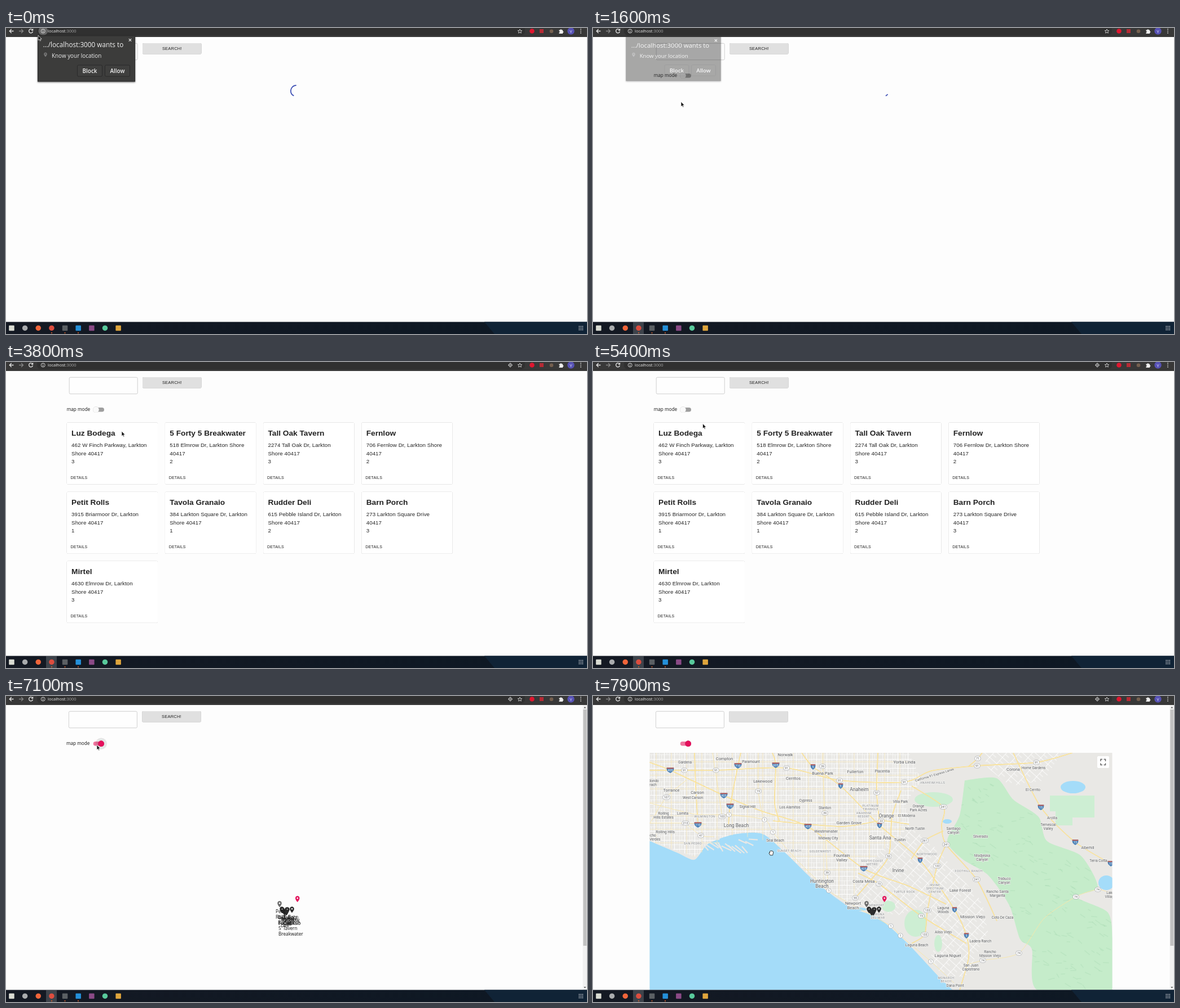
An HTML page that plays this animation: 1030x544 px, repeating every 8 s.

```html
<!DOCTYPE html>
<html lang="en">
<head>
<meta charset="utf-8">
<title>Restaurant finder</title>
<style>
html, body { margin: 0; width: 100%; height: 100%; overflow: hidden; background: #fdfdfd; }
svg { display: block; }
text { font-family: "Open Sans", "Noto Sans", sans-serif; }
.arial, .arial text { font-family: "Liberation Sans", Arial, sans-serif; }
.mid { text-anchor: middle; }
.raised { filter: drop-shadow(0 .9px .6px rgba(0,0,0,.36)); }
#map text { font-family: Roboto, sans-serif; text-anchor: middle; fill: #5c5d60; }
#places text { paint-order: stroke; stroke: #f4f4f2; stroke-width: 1.5px; stroke-linejoin: round; }
#roads path { fill: none; stroke-linejoin: round; }
.icon { fill: none; stroke: #e4e4e4; stroke-width: 1.3; }
</style>
</head>
<body>
<svg width="1030" height="544" viewBox="0 0 1030 544">
<defs>
  <linearGradient id="barFill"><stop stop-color="#141923"/><stop offset="1" stop-color="#0d1824"/></linearGradient>
  <pattern id="grid" width="18" height="16" patternUnits="userSpaceOnUse">
    <path d="M0 .5H18M.5 0V16" stroke="#fff"/>
    <path d="M0 8.500H18M9.500 0V16M5 0V8M13.500 8V16" stroke="#fff" stroke-width=".55"/>
  </pattern>
  <pattern id="slant" width="17" height="15" patternUnits="userSpaceOnUse" patternTransform="rotate(42)">
    <path d="M0 .5H17M.5 0V15M0 8H9" stroke="#fff" stroke-width=".8"/>
  </pattern>
  <clipPath id="mapBox"><path d="M100.500 101H920.500V522.500H100.500Z"/></clipPath>
  <clipPath id="city"><path id="cityShape" d="M101 101H560L582 150 554 190 562 232 520 268 470 318 460 372 410 342 320 260 250 246 180 286 101 258Z"/></clipPath>
  <clipPath id="woods"><path id="woodShape"/></clipPath>
  <path id="pin" transform="scale(.538) translate(-12 -12)" fill-rule="evenodd"
    d="M12 2C8.130 2 5 5.130 5 9c0 5.250 7 13 7 13s7-7.750 7-13c0-3.870-3.130-7-7-7zm0 9.500a2.500 2.500 0 0 1 0-5a2.500 2.500 0 0 1 0 5z"/>
</defs>
<rect width="1030" height="544" fill="#fdfdfd"/>

<g id="page">
  <rect x="112.200" y="27.300" width="121" height="29.400" rx="2" fill="#fefefe" stroke="#c4c4c4" stroke-width=".8"/>
  <rect class="raised" x="242" y="27" width="104.500" height="19.400" rx="2" fill="#e0e0e0"/>
  <g id="words">
    <text class="arial mid" x="294.300" y="39.400" font-size="7.530" letter-spacing=".2" fill="#222">SEARCH!</text>
    <text x="107.700" y="87" font-size="8.200" fill="#111">map mode</text>
  </g>
  <rect id="track" x="155.500" y="80.900" width="18.500" height="7.500" rx="3.750"/>
  <circle id="halo" cy="84.700" r="10.300"/>
  <circle id="thumb" class="raised" cy="84.700" r="5.400"/>
</g>
<g id="cards" class="arial" fill="#222"></g>
<g id="spinner" transform="translate(514.700 111.700) scale(.489)"><circle id="arc" r="20.200" fill="none" stroke="#3f51b5" stroke-width="3.600"/></g>

<g id="map" clip-path="url(#mapBox)">
  <g id="land"></g>
  <g id="roads"></g>
  <g id="places"></g>
  <g id="shields"></g>
  <g id="tiles" fill="#e5e3df"></g>
  <g id="full"><rect class="raised" x="894" y="107" width="21" height="21" rx="1" fill="#fff"/>
    <path d="M900 116v-3.500h3M905.500 112.500h3v3.500M908.500 119.500v3h-3M903 122.500h-3v-3" fill="none" stroke="#666" stroke-width="1.500"/></g>
</g>
<g id="pins"></g>
<g id="bigNames"></g>
<g id="smallNames" class="arial"></g>

<g id="scroll">
  <rect x="1022.500" y="16" width="7.500" height="507" fill="#f1f1f1"/>
  <rect x="1023.300" y="24" width="6" height="420" fill="#c1c1c1"/>
  <path d="M1024.300 21.500h4l-2-2.500zM1024.300 517h4l-2 2.500z" fill="#555"/>
</g>
<g id="status"><path d="M0 508H339q2 0 2 2V523H0Z" fill="#818281"/>
  <text x="1" y="518.700" font-size="9.900" fill="#f4f4f4">Waiting for developers.zomato.com…</text></g>

<g id="toolbar">
  <rect width="1030" height="16" fill="#383838"/>
  <rect x="55" y="-4" width="865" height="17" rx="7" fill="#303030"/>
  <circle id="reloadGlow" cx="44" cy="5.500" r="7.500" fill="#555"/>
  <rect id="infoGlow" x="57.500" y="-2" width="16.500" height="14.500" rx="7" fill="#656565"/>
  <g class="icon">
    <path d="M13.500 5.500H6.500M9.700 2L6.200 5.500 9.700 9"/>
    <path d="M23 5.500H30M27 2L30.500 5.500 27 9" stroke="#858585"/>
    <path id="reload" d="M47 3.300A3.500 3.500 0 1 0 47.500 6.300M47.600 1.500V4.200H44.800"/>
    <path id="stop" d="M41 2.500L47 8.500M47 2.500L41 8.500"/>
    <circle cx="65.700" cy="5.500" r="3.500" stroke-width=".9"/>
    <path d="M65.700 5V7.700M65.700 3.200V4.200" stroke-width="1"/>
    <g id="gps" stroke-width=".9"><circle cx="894" cy="5.500" r="2.700"/><circle cx="894" cy="5.500" r=".8"/><path d="M894 1.500V3M894 8V9.500M890 5.500H891.500M896.500 5.500H898"/></g>
    <path d="M911 2l1 2.500 2.700.2-2 1.800.7 2.600-2.400-1.400-2.400 1.400.7-2.600-2-1.800 2.700-.2z" stroke-width=".8"/>
  </g>
  <text x="74" y="8.300" font-size="7.500" fill="#ececec">localhost<tspan fill="#a4a4a4">:3000</tspan></text>
  <circle cx="932.500" cy="5.500" r="4.300" fill="#e0162f"/>
  <rect x="946" y="2" width="7" height="7" fill="#b52a34"/>
  <circle cx="967" cy="5.800" r="3.300" fill="#75604f"/>
  <path d="M980.500 3.500h2a1.300 1.300 0 0 1 2.600 0h2v2.200a1.300 1.300 0 0 1 0 2.600v1.700h-6.600v-2a1.200 1.200 0 0 0 0-2.400z" fill="#eee"/>
  <circle cx="1001.500" cy="5.500" r="6.200" fill="#5752b5"/>
  <text class="mid" x="1001.500" y="8.500" font-size="8" fill="#e8e8ff">Y</text>
  <path d="M1019 1.500v1.600M1019 4.700v1.600M1019 7.900v1.600" stroke="#e4e4e4" stroke-width="1.600"/>
</g>

<g id="popup">
  <rect x="56.500" y="14" width="172" height="81" fill="#3c3c3b" stroke="#2c2c2c" style="filter:drop-shadow(0 1px 1.500px rgba(0,0,0,.55))"/>
  <text x="65.500" y="34.300" font-size="11.750" fill="#f2f2f2">…/localhost:3000 wants to</text>
  <text x="81" y="53" font-size="9.900" fill="#ededed">Know your location</text>
  <use href="#pin" transform="translate(70 47.500) scale(.75)" fill="#777"/>
  <path d="M217.800 19.200l4.400 4.400M222.200 19.200l-4.400 4.400" stroke="#eee" stroke-width="1.200"/>
  <g fill="#3f3f3e" stroke="#2a2a2a"><rect x="126.500" y="66" width="44" height="20" rx="2"/><rect x="175.500" y="66" width="44" height="20" rx="2"/></g>
  <g class="mid" font-size="9.900" font-weight="600" fill="#f2f2f2"><text x="148.500" y="79.500">Block</text><text x="197.500" y="79.500">Allow</text></g>
</g>

<g id="taskbar">
  <rect y="522.500" width="1030" height="22" fill="url(#barFill)"/>
  <path d="M848 522.500H1030V544H866Z" fill="#102336"/>
  <rect id="active" x="71" y="523" width="19" height="21" fill="#3d434b"/>
  <g id="apps"></g>
  <path d="M80 542h2M103.500 542h2M127 542h2" stroke="#e2642c" stroke-width="1.500"/>
  <path d="M1015.500 530.500h8M1015.500 533.500h8M1015.500 536.500h8" stroke="#d5d8dc" stroke-width="1.600" stroke-dasharray="1.600 1.400"/>
</g>
<path id="arrow" d="M0 0V8.800L2 7 3.400 10 4.800 9.300 3.500 6.500H6.200Z" fill="#161616" stroke="#fff" stroke-width=".7"/>
<path id="hand" d="M-2 4L-4 .5Q-4-1-2.500 0V-3Q-1.500-4.300-1-3Q0-5 .8-3.300Q2-4.500 2.400-2.600Q3.800-3 3.700-1.300L3 2.300 2.600 4Z" fill="#fff" stroke="#222" stroke-width=".9"/>
</svg>
<script>
const LOOP = 8000, STEP = 100;
const $ = id => document.getElementById(id);
const set = (id, attrs) => { for (const k in attrs) $(id).setAttribute(k, attrs[k]); };
const show = (id, on) => { $(id).style.display = on ? '' : 'none'; };
const text = (x, y, s, attrs = '') => `<text x="${x}" y="${y}" ${attrs}>${s}</text>`;
const path = (d, attrs) => `<path d="${d}" ${attrs}/>`;
const repeat = (n, make) => Array.from({ length: n }, (_, i) => make(i)).join('');
const points = s => s.split(' ').map(p => p.split(',').map(parseFloat));

let seed = 7;
const random = () => (seed = seed * 16807 % 2147483647) / 2147483647;

// Smooth curve through a few key points
function curve(s) {
  const p = points(s), q = i => p[Math.max(0, Math.min(p.length - 1, i))];
  const ctrl = (i, a, b) => [0, 1].map(k => q(i)[k] + (q(b)[k] - q(a)[k]) / 8);
  return `M${p[0]}` + p.slice(1).map((end, i) => `C${ctrl(i, i - 1, i + 1)} ${ctrl(i + 1, i + 2, i)} ${end}`).join('');
}

$('apps').innerHTML = ['#d9dbd2', '#a9abad', '#f0653a', '#dc4d3f', '#5b6064', '#2490d9', '#8b4a86', '#58c99b', '#dfa53c']
  .map((c, i) => `<rect x="${5.2 + i * 23.65}" y="528.700" width="9.500" height="9.500" rx="${[1, 2, 3, 7].includes(i) ? 4.75 : 1}" fill="${c}"/>`).join('');

// Restaurants: name, address lines, rating, pin position
const restaurants = [
  ['Luz Bodega', '462 W Finch Parkway, Larkton', 'Shore 40417', 3, 489, 380],
  ['5 Forty 5 Breakwater', '518 Elmrow Dr, Larkton Shore', '40417', 2, 490, 381],
  ['Tall Oak Tavern', '2274 Tall Oak Dr, Larkton', 'Shore 40417', 3, 498, 381],
  ['Fernlow', '706 Fernlow Dr, Larkton Shore', '40417', 2, 497, 385],
  ['Petit Rolls', '3915 Briarmoor Dr, Larkton', 'Shore 40417', 1, 485, 370],
  ['Tavola Granaio', '384 Larkton Square Dr, Larkton', 'Shore 40417', 1, 499, 381],
  ['Rudder Deli', '615 Pebble Island Dr, Larkton', 'Shore 40417', 2, 494, 385],
  ['Barn Porch', '273 Larkton Square Drive', '40417', 3, 507, 380],
  ['Mirtel', '4630 Elmrow Dr, Larkton', 'Shore 40417', 3, 495, 384]
];
$('cards').innerHTML = restaurants.map(([name, ...info], i) => {
  const x = 107.7 + i % 4 * 174.2, y = 107.6 + Math.floor(i / 4) * 123.1;
  return `<g transform="translate(${x} ${y})"><rect class="raised" width="161.300" height="110" rx="2" fill="#fff"/>` +
    text(8.4, 23.3, name, 'font-size="13.700" font-weight="700"') +
    info.slice(0, 3).map((s, n) => text(8.4, 43.6 + n * 14.5, s, 'font-size="9.680" letter-spacing=".09"')).join('') +
    text(6.9, 100.3, 'DETAILS', 'font-size="7" letter-spacing=".16"') + '</g>';
}).join('');
const pin = (x, y, color) => `<use href="#pin" fill="${color}" transform="translate(${x} ${y})"/>`;
$('pins').innerHTML = restaurants.map(r => pin(r[4], r[5], r[5] < 375 ? '#6b6b6b' : '#2b2b2b')).join('') + pin(516.7, 361, '#e3145c');
const stack = (size, gap, drop) => restaurants.map(r => r[0].split(' ').map((word, n) =>
  text(r[4] - 7, r[5] + drop + n * gap, word, `font-size="${size}" fill="#111"`)).join('')).join('');
$('bigNames').innerHTML = stack(8.2, 9.6, 16);
$('smallNames').innerHTML = stack(6.1, 6.4, 13);

// Map ground
const coast = '101,258 150,279 180,291 204,263 250,246 300,245 340,278 395,331 456,376 505,394 556,438 614,500 638,523';
const woods = '659,150 715,146 745,184 790,215 805,258 865,284 895,340 856,357 912,384 921,430 921,523 788,523 778,450 757,432 738,372 700,318 655,290 628,258 650,212 659,150';
$('woodShape').setAttribute('d', curve(woods));
const disc = (x, y, rx, ry, color) => `<ellipse cx="${x}" cy="${y}" rx="${rx}" ry="${ry}" fill="${color}"/>`;
const water = '#a4dcf9', park = '#cdeed3';
$('land').innerHTML =
  path('M100 101H921V523H100Z', 'fill="#e9e8e5"') +
  '<use href="#cityShape" fill="url(#grid)"/>' +
  path('M520 268L562 232 600 262 690 366 700 420 660 500 620 496 596 470 612 430 590 370 540 390 460 372 470 318Z', 'fill="url(#slant)"') +
  path('M690 101H830L800 150 740 160 700 128Z', 'fill="url(#slant)"') +
  '<use href="#woodShape" fill="#c5ecca"/><g clip-path="url(#woods)">' +
  // hill shading
  repeat(260, () => path(`M${650 + random() * 270} ${145 + random() * 378}l${4 + random() * 7} ${random() * 10 - 2}`, 'stroke="#aadbb5" stroke-width="1.500" opacity=".4"')) + '</g>' +
  disc(604, 184, 34, 13, park) + disc(572, 404, 20, 24, park) + disc(524, 374, 12, 10, park) + disc(612, 440, 7, 15, park) +
  path('M810 177H889V216H850V230H820V205H810Z', `fill="${park}"`) +
  path(curve(coast) + 'H100V258Z', `fill="${water}"`) +
  disc(851, 162, 22, 11, water) + disc(910, 332, 14, 13, water) + disc(628, 223, 8, 4, water) + disc(472, 379, 13, 3, water) +
  // harbour piers
  repeat(16, i => path(`M${186 + i * 6} ${254 + random() * 14}l${8 + random() * 12} ${random() * 16}`, 'stroke="#e9e8e5" stroke-width="2.200"'));

// Roads: number, then key points; a star carries the road's shield
const roads = {
  1: '100,190 180,210 241,211* 304,220* 319,242* 360,290 418,346* 470,377 528,409* 545,426* 599,472* 640,510',
  19: '293,101 293,169* 300,210',
  39: '407,101 407,125* 411,208* 415,314* 418,346',
  47: '165,226 191,248* 215,250',
  74: '662,478 691,470* 755,457* 800,395 856,357* 895,344* 921,352',
  103: '212,101 229,214*',
  107: '101,226 130,180* 165,150',
  213: '100,226 164,226* 200,228',
  5: '370,101 390,126* 439,160* 508,230* 580,292* 641,380* 662,426* 666,465 650,523',
  15: '745,101 794,198* 855,260* 918,298*',
  22: '319,222 440,232 511,222* 560,228',
  55: '465,359* 490,330 524,285* 530,215 546,168',
  57: '505,101 503,172* 508,225',
  71: '690,101 682,111* 665,126',
  73: '470,315 507,334* 582,391* 662,440',
  91: '100,132 162,132* 218,132* 343,128* 437,150* 552,153* 600,133 681,124* 786,118* 850,101',
  110: '180,101 182,159 186,229*',
  133: '626,264 610,302* 593,381* 588,424* 565,440',
  241: '565,160 621,197* 618,230 626,264* 680,326* 716,400',
  261: '621,240 588,257* 564,290',
  405: '100,118 137,132* 232,177* 300,205 381,232* 480,307* 560,338 626,370',
  605: '318,101 324,123* 322,190 330,222',
  710: '262,101 257,124* 243,196* 240,232'
};
const interstates = ['5', '15', '110', '405', '605', '710'];
const local = ['1', '19', '39', '47', '74', '103', '107', '213'];
const drawn = Object.keys(roads).sort((a, b) => local.includes(b) - local.includes(a));
$('roads').innerHTML =
  '<g clip-path="url(#city)" stroke="#f8e9bd" stroke-width=".8">' +
  repeat(17, i => path(`M${112 + i * 27} 101v280`)) + repeat(9, i => path(`M101 ${117 + i * 24}h480`)) + '</g>' +
  drawn.map(n => local.includes(n)
    ? path(curve(roads[n]), 'stroke="#f9e6a8" stroke-width=".9"')
    : path(curve(roads[n]), 'stroke="#f6d989" stroke-width="1.600"') + path(curve(roads[n]), 'stroke="#fce9a6"')).join('');

function shield(n, x, y) {
  const w = 3 + n.length * 1.1, blue = interstates.includes(n);
  const shape = blue
    ? path(`M${x - w} ${y - 4.5}h${2 * w}q1.500 6-${w} 9.500q-${w + 1.5}-3.500-${w}-9.500z`, 'fill="#4b82b8"') + path(`M${x - w} ${y - 4.5}h${2 * w}v1.800h-${2 * w}z`, 'fill="#c4584e"')
    : `<rect x="${x - w}" y="${y - 4}" width="${2 * w}" height="8" rx="3.500" fill="#fff" stroke="#96999c" stroke-width=".6"/>`;
  return shape + text(x, y + 2.1, n, `font-size="5.300" style="fill:${blue ? '#fff' : '#555'}"`);
}
$('shields').innerHTML = drawn.map(n => roads[n].split(' ').filter(p => p.endsWith('*'))
  .map(p => shield(n, ...points(p)[0])).join('')).join('');

// Place names by size
const places = {
  8.5: 'Long Beach@254,232.5;Anaheim@472,169;Santa Ana@509,255;Orange@520,215.5;Irvine@541,313;Huntington|Beach@406,332',
  7.4: 'Torrance@139,170;Carson@185,174;Lakewood@301,154;Cerritos@355,149;Buena Park@407,140;Fullerton@465,137;Yorba Linda@552,120;Garden Grove@454,228;Westminster@413,242.5;Fountain|Valley@441,286;Costa Mesa@480,332;Newport|Beach@461,371;Lake Forest@651,348;Mission Viejo@673,395;Laguna Niguel@629,464;Tustin@544,258;Norwalk@341,107;Compton@233,114;Corona@745,133',
  6.4: 'Gardena@163,120;Paramount@280,119;West Carson@177,183;Lomita@159,211;Signal Hill@274,199;Rolling|Hills Estates@125,211;Rolling Hills@128,244;Rancho|Palos Verdes@101,250;Redondo|Beach@104,153;Cypress@377,187.5;Stanton@411,201;Los Alamitos@349,200;Seal Beach@323,258.5;Midway City@417,255;Placentia@513,136;Villa Park@545,190;Orange|Park Acres@577,198;El Modena@556,215;North Tustin@571,237.5;Santiago|Canyon@639,238;Silverado@687,252;Modjeska|Canyon@690,286;Trabuco|Canyon@729,327;Rancho Santa|Margarita@717,350;Coto De Caza@726,396;Laguna|Woods@621,379;Aliso Viejo@621,422;Ladera Ranch@687,438;Rancho|Mission Viejo@704,457;Laguna Beach@574,445;San Juan|Capistrano@670,481;Dana Point@642,517;El Cerrito@780,169;Home Gardens@781,130;Arcilla@814,219;Temescal|Valley@807,231;Alberhill@877,272;Terra Cotta@896,295;Lake|Village@917,352',
  5.3: 'WILMINGTON@198,216;SAN PEDRO@177,263.5;SUNSET BEACH@348,277;GOLDENWEST@403,278;PLATINUM|TRIANGLE@492,197;ANAHEIM|RESORT@480,210;ANAHEIM HILLS@602,155.5;SOUTH COAST|METRO@495,295;NORTHWOOD@592,283;FOOTHILL RANCH@666,313;IRVINE|SPECTRUM|CENTER@606,338;TURTLE ROCK@552,350;NEWPORT|COAST@503,374;CORONA|DEL MAR@505,390;MONARCH|BEACH@626,503'
};
const placeName = (entry, size) => {
  const [name, at] = entry.split('@'), [[x, y]] = points(at);
  const look = size < 6 ? 'letter-spacing=".4" style="fill:#85878b"' : '';
  return name.split('|').map((s, n) => text(x, y + n * (size * .9 + 1.3), s, `font-size="${size}" ${look}`)).join('');
};
$('places').innerHTML = Object.entries(places).map(([size, list]) => list.split(';').map(e => placeName(e, +size)).join('')).join('') +
  text(0, 0, 'California 91 Express Lanes', 'font-size="5.800" transform="translate(606 142) rotate(-17)"');

// Map tiles lift their cover from the middle outwards
const TILE = 137.7, COLS = 7;
$('tiles').innerHTML = repeat(COLS * 4, i =>
  `<rect x="${308 + (i % COLS - 2) * TILE}" y="${134.6 + (Math.floor(i / COLS) - 1) * TILE}" width="${TILE}" height="${TILE}" shape-rendering="crispEdges"/>`);
const tiles = [...$('tiles').children].map((el, i) => {
  const distance = Math.hypot(i % COLS - 3.2, Math.floor(i / COLS) - 1.8);
  return { el, delay: distance < 1.6 ? 0 : 120 };
});

const ramp = (t, from, span) => Math.max(0, Math.min(1, (t - from) / span));
const ease = q => .5 - .5 * Math.cos(Math.PI * q);

// Pointer moves: start, duration, destination
const moves = [
  [200, 500, 44, 6], [1000, 300, 156, 131], [2300, 500, 192, 79], [3000, 500, 205, 123],
  [5300, 200, 184, 96], [5600, 100, 161, 87], [7100, 400, 229, 114], [7500, 400, 316, 279]
];
const pointer = t => moves.reduce(([x, y], [from, span, toX, toY]) => {
  const k = ease(ramp(t, from, span));
  return [x + (toX - x) * k, y + (toY - y) * k];
}, [57, 13]);

function spin(t) {
  const turn = t < 1460 ? .26 + t / 1400 : .095 + (Math.min(t, 3600) - 1600) * 1.03 / 1400;
  const p = (turn + 1) % 1, grow = ease(ramp(p, 0, .5)), slide = ease(ramp(p, .5, .5));
  set('arc', {
    'stroke-dasharray': `${1 + 99 * grow} 200`,
    'stroke-dashoffset': -15 * grow - 110 * slide,
    transform: `rotate(${p * 360})`
  });
  show('spinner', t < 1200 || t >= 1500 && t < 3800);
}

function prompt(t) {
  const reloaded = t >= 1400;
  const open = reloaded ? ramp(t, 1400, 450) : 1;
  const close = ramp(t, reloaded ? 2900 : 800, 300);
  set('popup', {
    opacity: open * (1 - close),
    transform: `translate(${142.5 + close * 4} ${53 + close * 2}) scale(${.95 + .05 * open}) translate(-142.5 -53)`
  });
  show('infoGlow', t < 900 || t >= 1700 && t < 3300);
}

function render(t) {
  const mapMode = t >= 6800, mapReady = t >= 7200, loading = t >= 900 && t < 1500;
  spin(t);
  prompt(t);
  show('reloadGlow', t >= 600 && t < 1100);
  show('reload', !loading);
  show('stop', loading);
  show('gps', t >= 3000);
  show('active', t >= 200);

  show('cards', t >= 3800 && !mapMode);
  set('page', { transform: `translate(${mapMode ? -.8 : 0} 0)` });
  show('words', t < 7800);
  const cx = 159.5 + 10 * ease(ramp(t, 6700, 200));
  set('thumb', { cx, fill: mapMode ? '#e5105c' : '#fafafa' });
  set('track', { fill: mapMode ? '#f0759f' : '#9e9e9e' });
  set('halo', { cx, opacity: mapMode && !mapReady ? .09 : t >= 5700 && t < 7300 ? .04 : 0 });

  show('scroll', mapMode);
  show('map', mapReady);
  show('pins', mapMode);
  show('bigNames', mapMode && !mapReady);
  show('smallNames', mapReady && t < 7800);
  show('full', t >= 7800);
  show('status', t >= 7400 && t < 7600);
  for (const { el, delay } of tiles) el.setAttribute('opacity', 1 - ramp(t, 7290 + delay, 300));

  const [x, y] = pointer(t), grab = mapReady && y > 101;
  for (const id of ['arrow', 'hand']) set(id, { transform: `translate(${x} ${y})` });
  show('arrow', !grab);
  show('hand', grab);
}

const start = performance.now();
function tick() {
  const t = (performance.now() - start) % LOOP;
  render(Math.floor(t / STEP) * STEP);
  requestAnimationFrame(tick);
}
tick();
</script>
</body>
</html>
```
